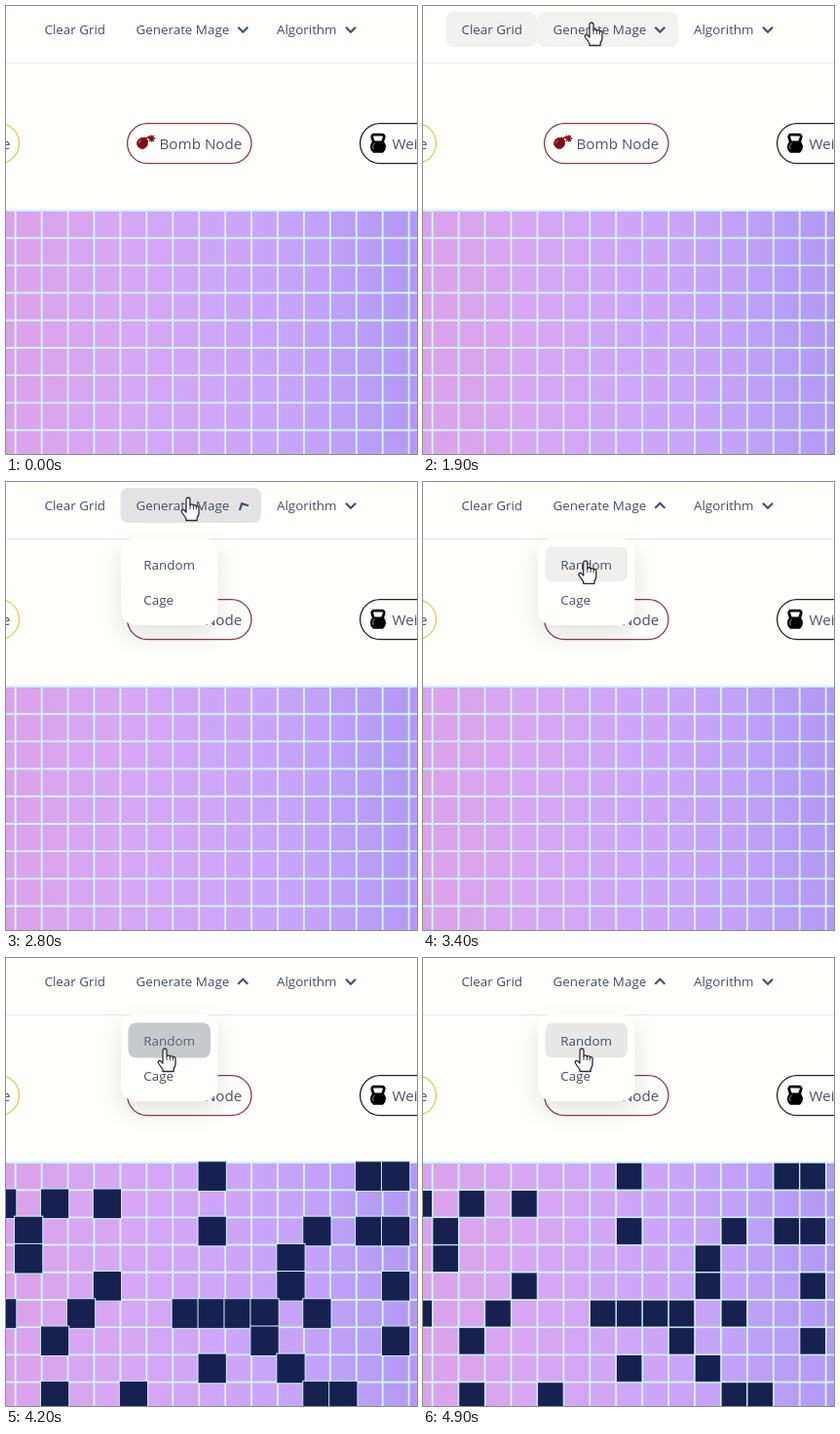
Recreate the animation shown at these times as an HTML page. Size 422 px wide and 460 px high, loop 5000 ms.

```html
<!DOCTYPE html>
<html lang="en">
<head>
<meta charset="utf-8">
<title>Grid maze menu</title>
<style>
  html, body { margin: 0; width: 100%; height: 100%; overflow: hidden; background: #fffffc; }
  svg { display: block; width: 422px; height: 460px; font-family: "Open Sans", "Noto Sans", sans-serif; }
  .menu { font-size: 13.4px; fill: #434f66; }
  .pill { font-size: 15.2px; fill: #4b5563; }
  .pill rect { fill: #fffffc; stroke-width: 1.3; }
  .hover { fill: #1f2937; fill-opacity: .1; }
  .press { fill: #07152f; }
  .chevron { fill: none; stroke: #434f72; stroke-width: 2.2; }
  #panel { fill: #fffffc; filter: drop-shadow(0 10px 12px rgba(0, 0, 0, .11)); }
</style>
</head>
<body>
<svg viewBox="0 0 422 460">
  <defs>
    <linearGradient id="sky" gradientUnits="userSpaceOnUse" x1="0" y1="345" x2="422" y2="325">
      <stop offset="0" stop-color="#dba2ea"/>
      <stop offset=".25" stop-color="#d8a7f3"/>
      <stop offset=".5" stop-color="#cfa6f9"/>
      <stop offset=".7" stop-color="#c7a4f9"/>
      <stop offset=".85" stop-color="#ba9ff6"/>
      <stop offset="1" stop-color="#b299f4"/>
    </linearGradient>
  </defs>
  <rect width="422" height="460" fill="#fffffc"/>
  <path d="M0 58.5H422" stroke="#e8e9e9"/>

  <g class="pill">
    <rect x="-110" y="120.6" width="123.5" height="41" rx="20.5" stroke="#dfcf58"/>
    <text x="4.5" y="147" text-anchor="end">Node</text>
    <rect x="124.6" y="120.6" width="127.4" height="41" rx="20.5" stroke="#8c3a4a"/>
    <text x="157.5" y="147">Bomb Node</text>
    <rect x="363.6" y="120.6" width="140" height="41" rx="20.5" stroke="#222"/>
    <text x="396.5" y="147">Weight Node</text>
  </g>
  <g fill="#7c1018" stroke="#7c1018">
    <circle cx="140" cy="141" r="5.4"/>
    <path d="M141 135.5l4 4" stroke-width="3.4"/>
    <path d="M143.5 137q1-3.4 5-1.6" fill="none" stroke-width="1.6"/>
    <path d="M147 133l5 6M152 133l-5 6M146 136h7.4M149.6 132.4v7.4" stroke-width="1.3"/>
    <path d="M136.6 141q.2-2.6 2.5-3" fill="none" stroke="#c98a8e" stroke-width=".9"/>
  </g>
  <g>
    <path d="M377.5 140L375.8 134.6Q375.5 132.4 378 132.2H386Q388.6 132.4 388.2 134.6L386.5 140" fill="none" stroke="#000" stroke-width="2.8"/>
    <path d="M377 138.5h10q3 2.5 3 6.5 0 3.5-3 5.7h-10q-3-2.2-3-5.7 0-4 3-6.5z"/>
    <path d="M377 147q-1.5-4 1.6-6.5" fill="none" stroke="#b5b5b5" stroke-width=".8"/>
  </g>

  <rect y="209" width="422" height="251" fill="url(#sky)"/>
  <path id="lines" stroke="#cff4fc" stroke-width="1.9" fill="none"/>
  <g id="walls" fill="#172150" stroke="#cff4fc" stroke-width=".9"></g>

  <g class="menu">
    <g id="clear">
      <rect class="hover" x="24" y="6" width="93" height="36" rx="8"/>
      <text x="39.5" y="29">Clear Grid</text>
    </g>
    <g id="generate">
      <rect class="hover" x="117.5" y="6" width="144.5" height="36" rx="8"/>
      <rect class="press" x="117.5" y="6" width="144.5" height="36" rx="8"/>
      <text x="133.5" y="29">Generate Mage</text>
      <path id="arrow" class="chevron" d="M238.3 21.8l5 5 5-5"/>
    </g>
    <text x="278" y="29">Algorithm</text>
    <path class="chevron" d="M349 21.8l5 5 5-5"/>
    <g id="drop">
      <rect id="panel" x="118" y="57.5" width="99.5" height="89.5" rx="15"/>
      <g id="random">
        <rect class="hover" x="125.5" y="66.5" width="84.5" height="36" rx="8"/>
        <rect class="press" x="125.5" y="66.5" width="84.5" height="36" rx="8"/>
        <text x="141.3" y="89.5">Random</text>
      </g>
      <text x="141.3" y="126">Cage</text>
    </g>
  </g>

  <g id="hand" stroke="#2b2b33" stroke-width="1.3" stroke-linejoin="round">
    <path fill="#fff" d="M-2 2a2 2 0 0 1 4 0V8.200q.3-1.400 1.700-1.400 1.500 0 1.700 1.800 .4-1 1.600-1 1.300 0 1.500 1.700 .4-.6 1.200-.6 1.300 0 1.300 1.800V16q0 2.500-1.800 4.500V23.500H-2V21.500L-6.200 15.500q-1.200-2 .2-2.900 1.300-.6 2.600 1L-2 15z"/>
    <path fill="none" stroke-width=".9" d="M2 8v4M5.400 8.600v3.600M8.400 9.400v3"/>
  </g>
</svg>
<script>
const LOOP = 5000, STEP = 100;
const GRID = { x: 9.700, y: 210, w: 26.930, h: 28.190 };
const WALL_ROWS = [
  [7, 13, 14], [-1, 1, 3], [0, 7, 11, 13, 14], [0, 10], [3, 10, 14],
  [-1, 2, 6, 7, 8, 9, 11], [1, 9, 14], [7, 10], [1, 4, 11, 12]
];
// time, x, y of the fingertip
const PATH = [
  [400, 262, -30], [600, 200, 18], [800, 109, 18], [1200, 86, 18], [1800, 86, 18],
  [1900, 173, 17], [2300, 187, 16], [3100, 187, 16], [3500, 163, 93], [5000, 163, 93]
];
const OPEN = 2660, BUILD = 4105;

const $ = id => document.getElementById(id);
const clamp = v => Math.max(0, Math.min(1, v));
const easeOut = p => 1 - (1 - clamp(p)) ** 3;
const smooth = p => p * p * (3 - 2 * p);
const mix = (a, b, p) => a + (b - a) * p;

// 200 ms fade in at `on`, fade out at `off`
const fade = (t, on, off) => easeOut((t - on) / 200) * (1 - easeOut((t - off) / 200));

function buildGrid() {
  let d = "";
  for (let c = 0; c < 16; c++) d += `M${GRID.x + c * GRID.w} 209V460`;
  for (let r = 0; r < 9; r++) d += `M0 ${GRID.y + r * GRID.h}H422`;
  $("lines").setAttribute("d", d);

  const half = { w: GRID.w / 2 - .2, h: GRID.h / 2 - .2 };
  return WALL_ROWS.flatMap((cols, r) => cols.map(c => {
    const el = document.createElementNS("http://www.w3.org/2000/svg", "rect");
    el.setAttribute("x", -half.w);
    el.setAttribute("y", -half.h);
    el.setAttribute("width", half.w * 2);
    el.setAttribute("height", half.h * 2);
    $("walls").append(el);
    return { el, x: GRID.x + (c + .5) * GRID.w, y: GRID.y + (r + .5) * GRID.h };
  }));
}

function setButton(id, hover, press = 0) {
  const box = $(id);
  box.querySelector(".hover").style.opacity = hover;
  const dark = box.querySelector(".press");
  if (!dark) return;
  dark.style.opacity = press;
  const rgb = [[67, 200], [79, 204], [102, 212]].map(([a, b]) => Math.round(mix(a, b, press)));
  box.querySelector("text").style.fill = `rgb(${rgb})`;
}

function wallScale(t) {
  const p = (t - BUILD) / 140;
  return p < 1 ? mix(.3, 1.2, smooth(clamp(p)) * .35 + easeOut(p) * .65)
               : mix(1.2, 1, smooth(clamp(p - 1)));
}

function moveHand(t) {
  const hand = $("hand");
  hand.style.display = t < PATH[0][0] ? "none" : "";
  const i = Math.max(1, PATH.findIndex(k => k[0] >= t));
  const [t0, x0, y0] = PATH[i - 1], [t1, x1, y1] = PATH[i];
  const p = smooth(clamp((t - t0) / (t1 - t0)));
  hand.setAttribute("transform", `translate(${mix(x0, x1, p)} ${mix(y0, y1, p)})`);
}

const walls = buildGrid();

function draw(t) {
  setButton("clear", fade(t, 735, 1870));
  setButton("generate", Math.max(fade(t, 520, 710), fade(t, 1855, 3230)), fade(t, 2490, OPEN));
  setButton("random", fade(t, 3330, LOOP), fade(t, 3690, BUILD));

  $("drop").style.display = t < OPEN ? "none" : "";
  $("arrow").setAttribute("transform", `rotate(${180 * easeOut((t - OPEN) / 300)} 243.3 24.3)`);

  $("walls").style.display = t < BUILD ? "none" : "";
  const s = wallScale(t);
  for (const { el, x, y } of walls) el.setAttribute("transform", `translate(${x} ${y}) scale(${s})`);
  moveHand(t);
}

const start = performance.now();
function tick() {
  const t = (performance.now() - start) % LOOP;
  draw(Math.floor(t / STEP) * STEP);
  requestAnimationFrame(tick);
}
tick();
</script>
</body>
</html>
```
